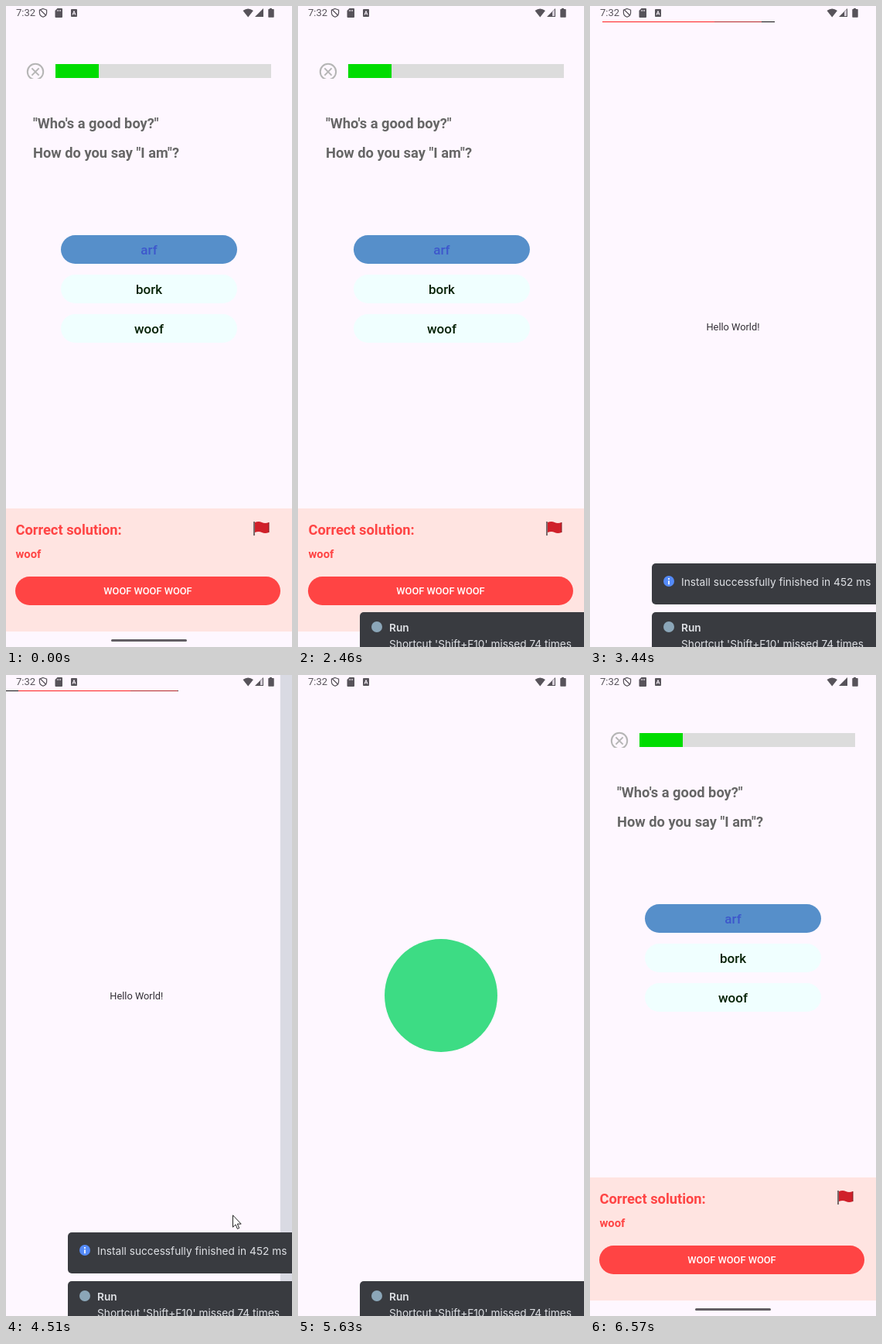
An HTML page for the animation above (9770 ms loop, 370 by 828 pixels).

```html
<!DOCTYPE html>
<html lang="en">
<head>
<meta charset="utf-8">
<title>Quiz reinstall</title>
<style>
  html, body { margin: 0; width: 100%; height: 100%; overflow: hidden; }
  #stage { position: relative; width: 370px; height: 828px; overflow: hidden; background: #d9dae3; font-family: Roboto, sans-serif; }
  #stage * { box-sizing: border-box; }
  .win { position: absolute; left: -1px; top: 0; width: 372px; height: 828px; background: #fef7ff; }
  .win > *, .abs { position: absolute; }
  .text { white-space: pre; line-height: 20px; }
  .ask { left: 36px; font-size: 18.3px; font-weight: 600; color: #666; }
  .pill { left: 72px; width: 228px; height: 37px; border-radius: 19px; background: #f0ffff; color: #062206; font-size: 17px; font-weight: 500; line-height: 38px; text-align: center; }
  .pill.picked { background: #568fca; color: #3d57cc; }
  #panel { left: 0; top: 649px; width: 372px; height: 159px; background: #ffe4e1; color: #ff4444; }
  #panel > * { position: absolute; }
  #next { left: 13px; top: 88px; width: 343px; height: 37px; border-radius: 19px; background: #ff4444; color: #fff; font-size: 12.8px; font-weight: 500; line-height: 37px; text-align: center; }
  .toast { position: absolute; left: 80px; width: 310px; height: 53px; border-radius: 5px; background: #393b40; color: #dfe1e5; font: 13.7px/20px Inter, sans-serif; white-space: pre; }
  .toast > * { position: absolute; }
  .toast span { left: 38px; }
  .dot { left: 15px; width: 14px; height: 14px; border-radius: 50%; }
  svg { display: block; overflow: visible; }
</style>
</head>
<body>
<div id="stage">
  <div class="win" id="hello">
    <div style="left:17px;top:20px;width:223px;height:1px;background:#111"></div>
    <div class="text" style="left:1px;width:370px;top:405px;text-align:center;font-size:12.8px;color:#333036">Hello World!</div>
  </div>
  <div class="abs" id="trace" style="left:16px;top:20px;width:206px;height:1px;background:linear-gradient(90deg,#ff2020 145px,#b52a2a 145px)"></div>

  <div class="win" id="quiz">
    <svg style="left:27px;top:73px" width="24" height="21" viewBox="0 0 24 21">
      <defs><clipPath id="cut"><path d="M0 0h24v21H0z"/></clipPath></defs>
      <g clip-path="url(#cut)" fill="none" stroke="#b5b5b5" stroke-width="2">
        <circle cx="12" cy="12" r="10.2"/><path d="M7.4 7.4l9.2 9.2M16.6 7.4l-9.2 9.2"/>
      </g>
    </svg>
    <div style="left:65px;top:75px;width:279px;height:18px;background:linear-gradient(90deg,#00dc00 56px,#dcdcdc 56px)"></div>
    <div class="text ask" style="top:142px">"Who's a good boy?"</div>
    <div class="text ask" style="top:180px">How do you say "I am"?</div>
    <div class="pill picked" style="top:296px">arf</div>
    <div class="pill" style="top:347px">bork</div>
    <div class="pill" style="top:398px">woof</div>
    <div id="panel">
      <div class="text" style="left:13.500px;top:18px;font-size:18.3px;font-weight:600">Correct solution:</div>
      <div class="text" style="left:13.500px;top:49px;font-size:14.8px;font-weight:600">woof</div>
      <svg style="left:321px;top:16px" width="22" height="20" viewBox="0 0 22 20">
        <path d="M1 1v18" stroke="#403638" stroke-width="1.4"/>
        <path d="M2 2q5-2 9 0t9 0v13q-5 2-9 0t-9 0z" fill="#d0202a"/>
        <path d="M20 2v13" stroke="#7a1a20"/>
      </svg>
      <div id="next">WOOF WOOF WOOF</div>
    </div>
    <div style="left:137px;top:818px;width:98px;height:3px;border-radius:2px;background:#625e64"></div>
  </div>

  <div class="win" id="splash">
    <div id="icon" style="left:113px;top:341px;width:146px;height:146px;border-radius:50%;background:#3ddc84"></div>
  </div>

  <svg class="abs" style="left:0;top:0" width="370" height="20" fill="#57535a">
    <text x="13" y="13" font-family="Roboto, sans-serif" font-size="13">7:32</text>
    <path d="M48 3.5l4.6 1.7v3.5q0 3.8-4.6 5.6-4.6-1.8-4.6-5.6V5.2zM44.5 5l7.5 7.5" fill="none" stroke="#57535a" stroke-width="1.2"/>
    <path d="M66.5 3H72q1 0 1 1v10q0 1-1 1h-7.5q-1 0-1-1V6z"/>
    <path d="M66.5 5v2M68.5 5v2M70.5 5v2" stroke="#fef7ff" stroke-width=".8"/>
    <rect x="84" y="4" width="8" height="10" rx="1"/>
    <path d="M86 11.5l2-5 2 5M86.7 10h2.6" fill="none" stroke="#fef7ff"/>
    <path d="M306.5 6q6.7-5 13.4 0l-6.7 8.5z"/>
    <path d="M333 3v11h-11z"/>
    <path id="weak" d="M329 7.5l3-3V13h-3z" fill="#d5ced8"/>
    <path d="M341 3h3v1h2q.7 0 .7.7V14q0 .7-.7.7h-6q-.7 0-.7-.7V4.7q0-.7.7-.7h1z"/>
  </svg>

  <div class="toast" id="install" style="top:720px">
    <i class="dot" style="top:16px;background:#548af7"></i>
    <svg style="left:15px;top:16px" width="14" height="14" stroke="#fff" stroke-width="1.7"><path d="M7 3v2M7 6.2v5"/></svg>
    <span style="top:14px">Install successfully finished in 452 ms</span>
  </div>
  <div class="toast" id="run" style="top:783px">
    <i class="dot" style="top:12px;background:#8ba6b8"></i>
    <span style="top:10px;font-weight:600">Run</span>
    <span style="top:31px">Shortcut 'Shift+F10' missed 74 times</span>
  </div>
  <svg class="abs" id="pointer" style="left:0;top:0" width="12" height="19" viewBox="0 0 12 19">
    <path d="M.5.8v15.4l3.5-3.3 2.4 5.5 2.3-1-2.4-5.3h4.9z" fill="#fff" stroke="#222"/>
  </svg>
</div>
<script>
const LOOP = 9770, TICK = 67;
const $ = id => document.getElementById(id);
const clamp = v => Math.min(1, Math.max(0, v));
const between = (t, a, b) => t >= a && t < b;
const show = (id, on) => { $(id).style.visibility = on ? 'visible' : 'hidden'; };
const move = (id, x, y = 0) => { $(id).style.transform = `translate(${x}px,${y}px)`; };
const bez = (u, a, b, c, d) => {
  const v = 1 - u;
  return v * v * v * a + 3 * v * v * u * b + 3 * v * u * u * c + u * u * u * d;
};

// Two joined cubics: a quick start with a very long settle.
const EARLY = [[0, .05, .133333, .166666], [0, 0, .06, .4]];
const LATE = [[.166666, .208333, .25, 1], [.4, .82, 1, 1]];
function emphasized(x) {
  x = clamp(x);
  const [xs, ys] = x < .166666 ? EARLY : LATE;
  let lo = 0, hi = 1;
  for (let i = 0; i < 24; i++) {
    const mid = (lo + hi) / 2;
    if (bez(mid, ...xs) < x) lo = mid; else hi = mid;
  }
  return bez(lo, ...ys);
}

const MOVES = [[2460, 2850], [4510, 5040], [6100, 6570]];
function sample(t) {
  const m = MOVES.find(([a, b]) => between(t, a, b));
  return m ? m[0] + Math.floor((t - m[0]) / TICK) * TICK : t;
}

function render(now) {
  const t = now % LOOP, s = sample(t);

  // Quiz closes over the page below
  const closing = between(t, 2460, 6100);
  const back = closing ? emphasized((s - 2435) / 450) : 0;
  const alpha = closing ? 1 - clamp((s - 2470) / 83) : 1;
  $('quiz').style.opacity = t >= 2850 && t < 6100 ? 0 : alpha;

  // Next task pushes the page out to the left
  const push = t < 4510 ? 0 : t >= 5040 ? 1 : emphasized((s - 4480) / 430);
  const helloX = t < 2850 ? -37 * (1 - back) : -388 * push;
  move('hello', helloX);
  $('hello').style.boxShadow = t < 2850 ? '-40px 0 #fef7ff, 40px 0 #fef7ff' : 'none';
  show('hello', between(t, 2460, 5040));
  show('trace', between(t, 2590, 4580));
  move('splash', 388 * (1 - push));

  // Splash icon fades, then a circle grows from the top edge
  const leaving = t >= 6100;
  $('icon').style.opacity = leaving ? 1 - clamp((s - 6065) / 133) : 1;
  const open = leaving ? emphasized((s - 6148) / 400) : 0;
  const r = open * 1150;
  const mask = leaving ? `radial-gradient(circle at 50% 0, transparent ${r * .78}px, #000 ${r + .1}px)` : 'none';
  $('splash').style.maskImage = $('splash').style.webkitMaskImage = mask;
  show('splash', between(t, 4510, 6570));
  move('quiz', closing ? 37 * back : 0, leaving && t < 6570 ? 18 * (1 - open) : 0);

  show('weak', between(t, 2000, 6360));
  show('run', between(t, 1410, 6360));
  show('install', between(t, 3440, 5630));

  const tap = between(t, 190, 260);
  show('pointer', tap || between(t, 4510, 4590));
  move('pointer', tap ? 258 : 293, tap ? 741 : 697);
}

const start = performance.now();
function loop() {
  render(performance.now() - start);
  requestAnimationFrame(loop);
}
render(0);
requestAnimationFrame(loop);
</script>
</body>
</html>
```
